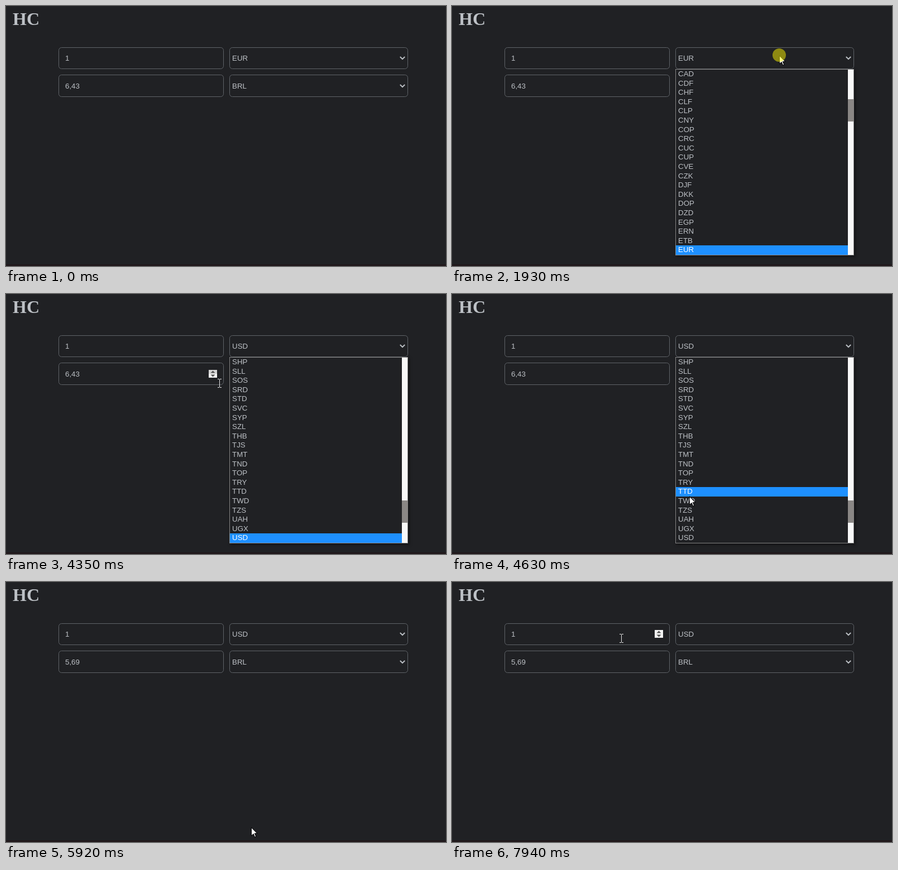
Write an HTML page with a canvas that moves like this. It is 788 px wide and 466 px high and loops after 8000 ms.

```html
<!DOCTYPE html>
<html lang="en">
<head>
<meta charset="utf-8">
<title>HC</title>
<style>
html, body { margin: 0; width: 100%; height: 100%; overflow: hidden; background: #202124; }
canvas { display: block; }
</style>
</head>
<body>
<canvas id="stage" width="788" height="466"></canvas>
<script>
const ctx = document.getElementById('stage').getContext('2d');
const LOOP = 8000;
const BG = '#202124', INK = '#bdc1c6', LINE = '#5f6368';
const SANS = '13.333px "Liberation Sans", Arial, sans-serif';
const SERIF = 'bold 32px "Liberation Serif", "Times New Roman", serif';

const EARLY = 'CAD CDF CHF CLF CLP CNY COP CRC CUC CUP CVE CZK DJF DKK DOP DZD EGP ERN ETB EUR'.split(' ');
const LATE = 'SEK SGD SHP SLL SOS SRD STD SVC SYP SZL THB TJS TMT TND TOP TRY TTD TWD TZS UAH UGX USD'.split(' ');
const ROWS = 20, ROW_H = 16.6, LIST_TOP = 114;

// Pointer positions: [time, x, y], each held until the next
const trail = [
  [110, 693, 369], [180, 618, 150], [250, 584, 80],
  [650, 584, 83], [720, 585, 86], [870, 586, 88]
];
const addSteps = (start, gap, points) =>
  points.forEach(([x, y], i) => trail.push([start + i * gap, x, y]));

addSteps(4000, 70, [
  [572, 78], [532, 62], [480, 56], [430, 72], [396, 115], [380, 159],
  [381, 205], [389, 262], [408, 320], [425, 362], [438, 386], [443, 394]
]);
trail.push([4850, 443, 403], [4920, 443, 411], [5050, 443, 418],
           [5120, 442, 427], [5250, 440, 435], [5320, 439, 439]);
addSteps(6200, 75, Array.from({ length: 11 }, (_, i) => {
  const p = (i + 1) / 11, e = p * p * (3 - 2 * p);
  return [Math.round(439 - 138 * e), Math.round(439 - 339 * e)];
}));

const clicks = [[1800, 2060, 586, 88], [5660, 5920, 439, 439], [7410, 7610, 301, 100]];

const between = (t, a, b) => t >= a && t < b;

function rect(x, y, w, h, color) {
  ctx.fillStyle = color;
  ctx.fillRect(x, y, w, h);
}

function text(str, x, y, color = INK, font = SANS) {
  ctx.font = font;
  ctx.fillStyle = color;
  ctx.fillText(str, x, y);
}

function shape(points, color) {
  ctx.beginPath();
  points.forEach(([x, y]) => ctx.lineTo(x, y));
  ctx.closePath();
  ctx.fillStyle = color;
  ctx.fill();
}

function field(x, y, w, h) {
  ctx.beginPath();
  ctx.roundRect(x + .5, y + .5, w - 1, h - 1, 5);
  ctx.strokeStyle = LINE;
  ctx.lineWidth = 1;
  ctx.stroke();
}

function chevron(y) {
  ctx.beginPath();
  ctx.moveTo(705.8, y - 2);
  ctx.lineTo(710, y + 2.2);
  ctx.lineTo(714.2, y - 2);
  ctx.strokeStyle = INK;
  ctx.lineWidth = 2;
  ctx.stroke();
}

function spinner(y, upHot) {
  rect(363, y, 15, 14, '#f4f4f4');
  if (upHot) rect(363, y, 15, 7, '#d4d4d4');
  shape([[366.5, y + 5.5], [370.5, y + 1.5], [374.5, y + 5.5]], '#505050');
  shape([[366.5, y + 8.5], [370.5, y + 12.5], [374.5, y + 8.5]], '#505050');
}

function popup(codes, marked, thumb) {
  ctx.save();
  ctx.shadowColor = 'rgba(0,0,0,.5)';
  ctx.shadowBlur = 5;
  ctx.shadowOffsetX = ctx.shadowOffsetY = 2;
  rect(400, 113, 320, 334, '#858585');
  ctx.restore();
  rect(401, LIST_TOP, 308, 332, BG);
  rect(709, LIST_TOP, 10, 332, '#f8f8f8');
  rect(709, thumb, 10, 40, '#8a8785');
  const top = Math.round(LIST_TOP + marked * ROW_H);
  rect(401, top, 308, Math.round(LIST_TOP + (marked + 1) * ROW_H) - top, '#1e90ff');
  codes.forEach((code, i) =>
    text(code, 405, Math.round(125.9 + i * ROW_H), i === marked ? '#fff' : INK));
}

function arrow(x, y) {
  const outline = [[0, 0], [0, 17], [4, 13.4], [6.4, 19], [9.4, 17.8], [7, 12.2], [12, 12]];
  const inner = [[1, 2.3], [1, 14.8], [4.3, 11.8], [6.9, 17.6], [8.1, 17.1], [5.6, 11.2], [9.7, 11.1]];
  const move = pts => pts.map(([px, py]) => [x + px, y + py]);
  shape(move(outline), '#08080a');
  shape(move(inner), '#fff');
}

function beam(x, y) {
  const c = x + 2, top = y - 7;
  rect(c, top + 1, 1, 14, '#e8e8e8');
  for (const row of [top, top + 15]) {
    rect(c - 3, row, 3, 1, '#e8e8e8');
    rect(c + 1, row, 3, 1, '#e8e8e8');
  }
}

function draw(t) {
  const pos = trail.filter(p => p[0] <= t).pop();
  const [, x, y] = pos || [0, -50, -50];
  const open = between(t, 1870, 5920);
  const overInput = x >= 94 && x < 390;
  const inFirst = overInput && between(y, 74, 113);
  const inSecond = overInput && between(y, 123, 163);

  rect(0, 0, 788, 466, BG);
  rect(0, 463, 788, 3, '#20181b');
  text('HC', 12, 34, '#bdc1c6', SERIF);

  field(94, 74, 296, 39);
  field(400, 74, 320, 39);
  field(94, 123, 296, 40);
  field(400, 123, 320, 40);
  text('1', 106, 98);
  text(t < 5920 ? '6,43' : '5,69', 106, 148);
  text(t < 2790 ? 'EUR' : t < 3210 ? 'UAH' : 'USD', 405, 98);
  text('BRL', 405, 148);
  chevron(93);
  chevron(143);
  if (inFirst) spinner(86);
  if (inSecond) spinner(136, t < 5000);
  if (between(t, 7410, 7940)) rect(113, 86, 1, 15, INK);

  if (open) {
    const inList = x >= 401 && y >= LIST_TOP;
    const marked = inList ? Math.min(ROWS - 1, Math.floor((y - LIST_TOP) / ROW_H)) : ROWS - 1;
    if (t < 2790) popup(EARLY, marked, 167);
    else {
      const first = t < 3210 ? 0 : 2;
      popup(LATE.slice(first, first + ROWS), marked, 366 + first * 2);
    }
  }

  if (pos) (inFirst || inSecond ? beam : arrow)(x, y);
  for (const [from, to, cx, cy] of clicks) {
    if (!between(t, from, to)) continue;
    ctx.beginPath();
    ctx.arc(cx, cy, 12, 0, Math.PI * 2);
    ctx.fillStyle = 'rgba(252,244,0,.5)';
    ctx.fill();
  }
}

const begin = performance.now();
function tick() {
  draw((performance.now() - begin) % LOOP);
  requestAnimationFrame(tick);
}
tick();
</script>
</body>
</html>
```
